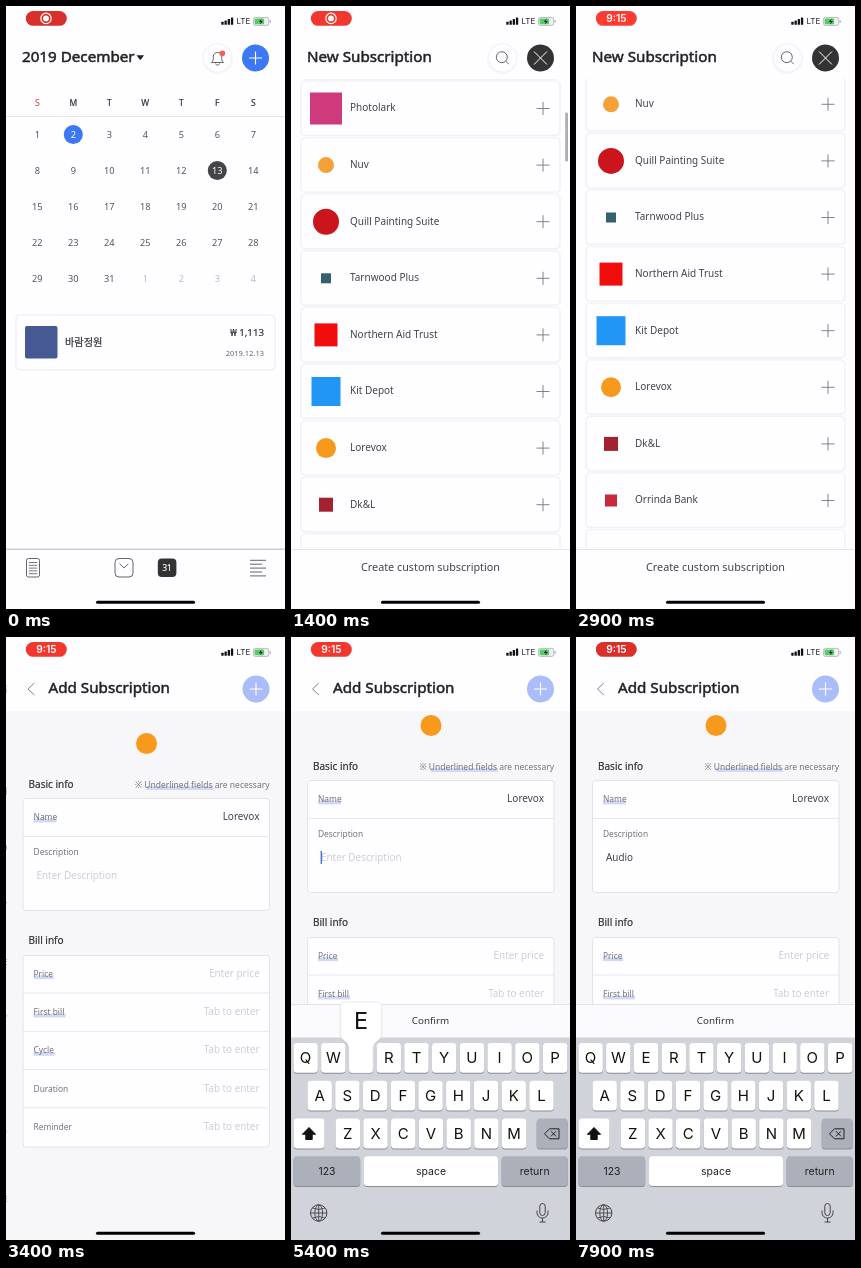
These frames come from a looping animation (279 by 603 pixels, 8000 ms). An HTML page:

```html
<!DOCTYPE html>
<html lang="en">
<head>
<meta charset="utf-8">
<title>Subscription calendar</title>
<style>
html, body { margin: 0; width: 100%; height: 100%; overflow: hidden; background: #fefdff; }
svg { display: block; width: 100vw; height: 100vh; }
text { font-family: "Noto Sans", "Noto Sans CJK KR", "Noto Sans CJK JP", sans-serif; white-space: pre; }
.sys { font-family: Inter, Roboto, sans-serif; }
</style>
</head>
<body>
<svg id="stage" viewBox="0 0 279 603"></svg>
<script>
const LOOP = 8000, STEP = 100, W = 279, H = 603;
const PAPER = '#fefdff', INK = '#333', GREY = '#747378', FAINT = '#cfced3', BLUE = '#3c78f6', KEY_GREY = '#abb0bb';
const stage = document.getElementById('stage');

function add(parent, tag, attrs = {}, content) {
  const node = document.createElementNS('http://www.w3.org/2000/svg', tag);
  for (const name in attrs) node.setAttribute(name, attrs[name]);
  if (content !== undefined) node.textContent = content;
  return parent.appendChild(node);
}
const group = parent => add(parent, 'g');
const rect = (p, x, y, width, height, fill, rx = 0, more) => add(p, 'rect', { x, y, width, height, fill, rx, ...more });
const circle = (p, cx, cy, r, fill, more) => add(p, 'circle', { cx, cy, r, fill, ...more });
const line = (p, d, stroke, width = 1, more) => add(p, 'path', { d, stroke, 'stroke-width': width, fill: 'none', ...more });
// Text is placed by the middle of its capitals; a thin stroke gives the medium weights.
const label = (p, x, cy, size, content, fill = INK, anchor = 'start', more) =>
  add(p, 'text', { x, y: cy + size * 0.357, 'font-size': size, fill, stroke: fill, 'stroke-width': 0, 'text-anchor': anchor, ...more }, content);
const MEDIUM = { 'stroke-width': 0.2 };
const HEAVY = { 'stroke-width': 0.5 };
const SYS = { class: 'sys' };
const move = (node, x, y) => node.setAttribute('transform', `translate(${x.toFixed(2)} ${y.toFixed(2)})`);
const show = (node, on) => node.setAttribute('visibility', on ? 'visible' : 'hidden');

const title = (p, x, content) => label(p, x, 50.3, 15.2, content, '#222', 'start', HEAVY);
function plus(p, cx, cy, r, color, width) {
  line(p, `M${cx - r} ${cy}h${2 * r}M${cx} ${cy - r}v${2 * r}`, color, width);
}
function softCircle(p, cx, cy) {
  [16, 15.2, 14.4].forEach((r, i) => circle(p, cx, cy + 0.4, r, ['#fbfafc', '#f7f6f9', '#f2f1f5'][i]));
  circle(p, cx, cy, 13.5, PAPER);
}
function card(p, y, h) {
  rect(p, 9, y - 1, 261, h + 2.4, '#f7f6f9', 5);
  rect(p, 9.8, y - 0.4, 259.4, h + 1.2, '#f1f0f4', 4.5);
  rect(p, 10.8, y + 0.4, 257.4, h - 0.8, PAPER, 4);
}
function mark(p, shape, cx, cy, r, fill) {
  if (shape === 'circle') circle(p, cx, cy, r, fill);
  else rect(p, cx - r, cy - r, 2 * r, 2 * r, fill);
}

function buildCalendar(p) {
  rect(p, 0, 0, W, H, PAPER);
  title(p, 16, '2019 December');
  add(p, 'path', { d: 'M130.5 49.3h7.6l-3.8 5z', fill: '#222' });
  softCircle(p, 211.5, 52);
  line(p, 'M205.5 56.5h12c-2-1.6-1.8-3.4-1.8-5.6 0-6-8.4-6-8.4 0 0 2.2.2 4-1.8 5.6zM209.5 57.5c.6 2.2 3.4 2.2 4 0', '#555', 0.9);
  circle(p, 216.3, 47.3, 2.9, '#f1605c');
  circle(p, 249.5, 52, 13.5, BLUE);
  plus(p, 249.5, 52, 6.5, '#fff', 1.1);

  const column = i => 31.3 + 36 * i;
  [...'SMTWTFS'].forEach((day, i) => label(p, column(i), 96.5, 8.5, day, i ? INK : '#e0574f', 'middle', MEDIUM));
  line(p, 'M0 110.5H279', '#e5e4e8');
  circle(p, column(1), 128.5, 9.5, BLUE);
  circle(p, column(5), 164.5, 9.5, '#454447');
  for (let i = 0; i < 35; i++) {
    const day = i % 31 + 1;
    const fill = i === 1 || i === 12 ? '#fff' : i > 30 ? '#bbb' : '#555';
    label(p, column(i % 7), 128.3 + 36 * Math.floor(i / 7), 9.2, day, fill, 'middle');
  }

  card(p, 309, 54.5);
  rect(p, 19, 320, 32.5, 32.5, '#475993', 2);
  label(p, 59, 336, 10.2, '바람정원', INK, 'start', MEDIUM);
  label(p, 258, 326.5, 9.7, '₩ 1,113', INK, 'end', MEDIUM);
  label(p, 258, 347, 7.5, '2019.12.13', '#666', 'end');

  line(p, 'M0 543.3H279', '#cfced2', 1.4);
  rect(p, 20.5, 552.5, 13, 18.5, 'none', 2, { stroke: '#555', 'stroke-width': 0.9 });
  line(p, 'M22.8 556.5h8.4m-8.4 2.8h8.4m-8.4 2.8h8.4m-8.4 2.8h8.4m-8.4 2.8h8.4', '#555', 0.8);
  rect(p, 109, 552.5, 18, 18.5, 'none', 4, { stroke: '#555', 'stroke-width': 0.9 });
  line(p, 'M113.5 557.5l4.3 4.5 4.5-4', '#555', 0.9);
  rect(p, 151.8, 552.5, 18.6, 18.6, INK, 4);
  label(p, 161, 562, 8, '31', '#fff', 'middle', MEDIUM);
  line(p, 'M244 554.3h16m-16 3.9h12m-12 3.9h16m-16 3.9h12m-12 3.9h16', '#555', 0.9);
}

const SERVICES = [
  ['7Keyhaven', 'circle', 14, '#3b80d8'],
  ['Talkwren', 'square', 16, '#475993'],
  ['Photolark', 'square', 16, '#cf3a7c'],
  ['Nuv', 'circle', 8, '#f6a038'],
  ['Quill Painting Suite', 'circle', 13, '#c9151b'],
  ['Tarnwood Plus', 'square', 5, '#35606f'],
  ['Northern Aid Trust', 'square', 11.5, '#f20d0d'],
  ['Kit Depot', 'square', 14.5, '#2196f4'],
  ['Lorevox', 'circle', 10, '#f7991c'],
  ['Dk&L', 'square', 7, '#a3222f'],
  ['Orrinda Bank', 'square', 6, '#c9283c'],
  ['', 'circle', 0, 'none']
];
const PITCH = 56.6;

function buildList(p) {
  rect(p, 0, 0, W, H, PAPER);
  const rows = group(p);
  SERVICES.forEach(([name, shape, r, color], i) => {
    const cy = 100 + PITCH * i;
    card(rows, cy - 26.8, 54);
    mark(rows, shape, 35, cy + 0.5, r, color);
    label(rows, 59, cy - 0.2, 10, name, '#444');
    plus(rows, 252, cy + 0.5, 6.5, '#777', 0.9);
  });
  const bar = rect(p, 274.2, 113, 2.8, 49, '#aeadb2', 1.4);
  rect(p, 0, 0, W, 73, PAPER);
  title(p, 16, 'New Subscription');
  softCircle(p, 211.5, 52);
  circle(p, 210.8, 51.2, 5.5, 'none', { stroke: '#555', 'stroke-width': 0.9 });
  line(p, 'M214.8 55.2l3 3', '#555', 0.9);
  circle(p, 249.5, 52, 13.5, INK);
  line(p, 'M243 45.5l13 13m0-13l-13 13', '#fff', 1);
  rect(p, 0, 543, W, 60, PAPER);
  line(p, 'M0 543.5H279', '#e6e5e9');
  label(p, 139.5, 561, 10.8, 'Create custom subscription', '#444', 'middle');
  return { rows, bar };
}

function buildForm(p) {
  rect(p, 0, 0, W, H, '#f7f6f9');
  const body = group(p);
  const box = (y, h) => rect(body, 16.5, y, 246.5, h, PAPER, 3, { stroke: '#e4e3e8', 'stroke-width': 1 });
  const divider = y => line(body, `M16.5 ${y}H263`, '#e8e7eb');
  const band = (x, cy, width) => rect(body, x, cy + 1.6, width, 3.8, '#d0d8f5');
  const field = (cy, name, bandWidth) => {
    if (bandWidth) band(27, cy, bandWidth);
    label(body, 27, cy, 8.4, name, GREY);
  };
  mark(body, 'circle', 140, 106.5, 10.5, '#f7991c');
  label(body, 22, 147, 10, 'Basic info', INK, 'start', MEDIUM);
  band(140, 147.5, 67);
  label(body, 263, 147.5, 8.5, '※ Underlined fields are necessary', GREY, 'end');
  box(161.5, 112);
  divider(199.5);
  field(180, 'Name', 23);
  label(body, 253, 179.3, 10, 'Lorevox', '#444', 'end');
  field(215, 'Description');
  const hint = label(body, 30, 238, 9.9, 'Enter Description', FAINT);
  const value = label(body, 30, 238, 9.9, '', '#444');
  const caret = rect(body, 29.6, 232, 1.4, 13, '#4a72dc');

  label(body, 22, 303.5, 10, 'Bill info', INK, 'start', MEDIUM);
  box(318.5, 191.5);
  [['Price', 20], ['First bill', 32], ['Cycle', 21], ['Duration'], ['Reminder']].forEach(([name, width], i) => {
    const cy = 336.7 + 38.3 * i;
    if (i) divider(cy - 19);
    field(cy, name, width);
    label(body, 253, cy - 0.4, 9.9, i ? 'Tab to enter' : 'Enter price', FAINT, 'end');
  });

  rect(p, 0, 0, W, 74, PAPER);
  line(p, 'M27.8 46l-6.3 6 6.3 6', '#777', 0.9);
  title(p, 42, 'Add Subscription');
  circle(p, 249.5, 52, 13.5, '#aabdf9');
  plus(p, 249.5, 52, 6.5, '#fff', 1.1);
  return { body, hint, value, caret };
}

function buildKeyboard(p) {
  rect(p, 0, 367, W, 34, '#fbfafd');
  line(p, 'M0 367.5H279', '#e2e1e6');
  label(p, 139.5, 384, 9.8, 'Confirm', INK, 'middle');
  rect(p, 0, 400.5, W, 203, '#d1d3da');
  const key = (x, y, width, fill) => {
    rect(p, x, y + 1, width, 29.8, '#8b8d93', 3.5);
    return rect(p, x, y, width, 29.8, fill, 3.5);
  };
  const letters = [];
  [['QWERTYUIOP', 14.6], ['ASDFGHJKL', 28.7], ['ZXCVBNM', 56.8]].forEach(([chars, x0], row) => {
    [...chars].forEach((char, i) => {
      const x = x0 + 27.72 * i, y = 421 + 37.8 * row;
      key(x - 12.2, y - 15, 24.4, '#fff');
      letters.push({ char, x, y, node: label(p, x, y, 15, char, '#111', 'middle', SYS) });
    });
  });
  const shift = key(2.5, 481.6, 31, '#fff');
  const arrow = add(p, 'path', { d: 'M18 490.5l6.6 6.8h-3.4v5.2h-6.4v-5.2h-3.4z', stroke: '#111', 'stroke-linejoin': 'round' });
  const erase = key(245.7, 481.6, 31, KEY_GREY);
  line(p, 'M258.5 491.8h9.5v10h-9.5l-5-5zM260 494.3l5 5m0-5l-5 5', '#222', 1, { 'stroke-linejoin': 'round' });
  key(2.5, 519.3, 66.7, KEY_GREY);
  const space = key(73, 519.3, 134, '#fff');
  key(210.6, 519.3, 66.2, KEY_GREY);
  [['123', 36], ['space', 140], ['return', 243.7]].forEach(([name, x]) => label(p, x, 534, 10.5, name, '#222', 'middle', SYS));

  line(p, 'M19.5 576h16.4M27.7 567.8v16.4M21.5 571q6.2 3 12.4 0M21.5 581q6.2-3 12.4 0', '#444', 0.9);
  circle(p, 27.7, 576, 8.2, 'none', { stroke: '#444', 'stroke-width': 1 });
  add(p, 'ellipse', { cx: 27.7, cy: 576, rx: 3.9, ry: 8.2, fill: 'none', stroke: '#444', 'stroke-width': 0.9 });
  rect(p, 248.8, 566.5, 5.4, 12, 'none', 2.7, { stroke: '#444', 'stroke-width': 1 });
  line(p, 'M246 573.5v2c0 7.4 11 7.4 11 0v-2M251.5 581v4m-3 0h6', '#444', 1);

  const popup = group(p);
  const balloon = 'M-20.8-51q0-5 5-5h31.6q5 0 5 5v27c0 7-8.6 7-8.6 14v21q0 4-4 4h-16.4q-4 0-4-4v-21c0-7-8.6-7-8.6-14z';
  add(popup, 'path', { d: balloon, fill: '#8b8d93', opacity: 0.35, transform: 'translate(0 1)' });
  add(popup, 'path', { d: balloon, fill: '#fff', stroke: '#dcdde2', 'stroke-width': 0.6 });
  const popupChar = label(popup, 0, -37, 23.5, '', '#111', 'middle', SYS);
  return { letters, shift, arrow, erase, space, popup, popupChar };
}

function buildStatus(p) {
  const pill = rect(p, 19.8, 5, 41, 14.8, '#f33', 7.4);
  const dot = group(p);
  circle(dot, 40, 12.4, 5.2, 'none', { stroke: '#fff', 'stroke-width': 1.2 });
  circle(dot, 40, 12.4, 2.9, '#fff');
  const clock = label(p, 40.3, 12.4, 10.2, '9:15', '#fff', 'middle', { class: 'sys', 'font-weight': 600 });
  [3, 4.4, 5.8, 7.4].forEach((h, i) => rect(p, 215.3 + 3.2 * i, 18.8 - h, 2.3, h, '#111', 0.5));
  label(p, 230.6, 15.6, 8, 'LTE', '#222', 'start', SYS);
  rect(p, 247.4, 11.4, 15.4, 8, '#f0f0f2', 2, { stroke: '#b5b4b8', 'stroke-width': 0.9 });
  rect(p, 248.6, 12.6, 9.5, 5.6, '#55cc6a', 1);
  rect(p, 263.6, 13.9, 1.2, 3, '#b5b4b8', 0.6);
  add(p, 'path', { d: 'M255.6 12.6l-2.8 3.3h1.9l-.7 2.5 2.9-3.4h-2z', fill: '#222' });
  rect(p, 90, 594.7, 99, 3, '#000', 1.5);
  return { pill, dot, clock };
}

const calendar = group(stage), listPage = group(stage), formPage = group(stage), keyboard = group(stage);
buildCalendar(calendar);
const list = buildList(listPage), form = buildForm(formPage), keys = buildKeyboard(keyboard);
const status = buildStatus(group(stage));

const clamp = v => Math.max(0, Math.min(1, v));
const progress = (t, start, length) => clamp((t - start) / length);
const remaining = (t, start, length) => (1 - progress(t, start, length)) ** 3;

const HOLD = 140;
const PRESSES = [['e', 5340], ['erase', 5740], ['a', 6080], ['u', 6380], ['d', 6640], ['i', 6880], ['o', 7120], [' ', 7380]];

function typingAt(t) {
  let value = '', pressed = null;
  for (const [key, start] of PRESSES) {
    if (t < start) break;
    if (t < start + HOLD) { pressed = key; break; }
    if (key === 'erase') value = value.slice(0, -1);
    else value += value ? key : key.toUpperCase();
  }
  return { value, pressed, upper: !value || value.endsWith(' ') };
}

function drawTyping(t) {
  const { value, pressed, upper } = typingAt(t);
  const cased = char => upper ? char.toUpperCase() : char.toLowerCase();
  form.value.textContent = value;
  show(form.hint, !value);
  form.caret.setAttribute('x', 29.6 + (value ? form.value.getComputedTextLength() + 0.5 : 0));
  show(form.caret, t >= 4050 && (t - 4050) % 1000 < 600);

  for (const letter of keys.letters) letter.node.textContent = cased(letter.char);
  keys.shift.setAttribute('fill', upper ? '#fff' : KEY_GREY);
  keys.arrow.setAttribute('fill', upper ? '#111' : 'none');
  keys.erase.setAttribute('fill', pressed === 'erase' ? '#fff' : KEY_GREY);
  keys.space.setAttribute('fill', pressed === ' ' ? KEY_GREY : '#fff');
  const held = keys.letters.find(letter => letter.char.toLowerCase() === pressed);
  show(keys.popup, !!held);
  if (held) {
    move(keys.popup, held.x, held.y);
    keys.popupChar.textContent = cased(held.char);
  }
}

function draw(t) {
  const push = remaining(t, 2900, 570);
  move(listPage, -84 * (1 - push), H * remaining(t, 500, 494));
  move(formPage, W * push, 0);
  show(formPage, t >= 2900);

  const scroll = 172 * (1 - (1 - progress(t, 1050, 900) ** 1.3) ** 3);
  move(list.rows, 0, -scroll);
  list.bar.setAttribute('y', 113 + (scroll - 172) * 0.105);
  list.bar.setAttribute('opacity', progress(t, 1050, 100) * (1 - progress(t, 2150, 300)));

  const rise = remaining(t, 3994, 600);
  move(keyboard, 0, 236 * rise);
  move(form.body, 0, -18 * (1 - rise));
  if (t >= 2900) drawTyping(t);
  else [form.caret, keys.popup].forEach(node => show(node, false));

  const glow = (1 - Math.cos(t / 1000 * Math.PI)) / 2;
  status.pill.setAttribute('fill', `rgb(${216 + 39 * glow}, ${48 + 11 * glow}, ${42 + 6 * glow})`);
  show(status.dot, t < 2800);
  show(status.clock, t >= 2800);
}

const begin = performance.now();
function tick() {
  const t = (performance.now() - begin) % LOOP;
  draw(Math.floor(t / STEP) * STEP);
  requestAnimationFrame(tick);
}
tick();
</script>
</body>
</html>
```
